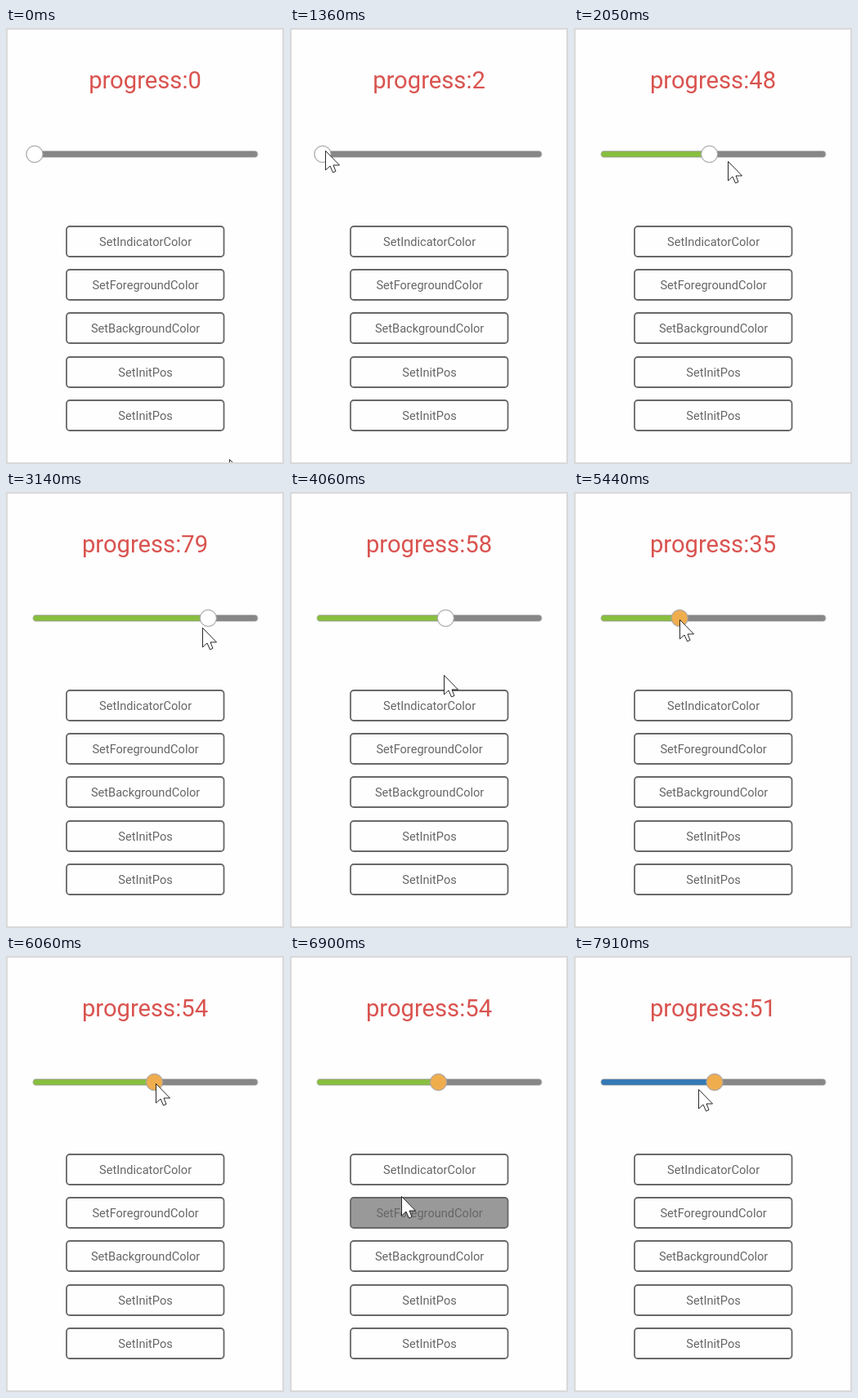
Animation of 340 by 534 pixels, one loop 7990 ms. Source, as an HTML page:

```html
<!DOCTYPE html>
<html lang="en">
<head>
<meta charset="utf-8">
<title>Slider demo</title>
<style>
  html, body { margin: 0; width: 100%; height: 100%; overflow: hidden; background: #fefefe; }
  svg { display: block; width: 340px; height: 534px; }
  text { font-family: Roboto, sans-serif; text-anchor: middle; }
  #label { font-size: 29.2px; fill: #d9534f; }
  .button rect { fill: #fefefe; stroke: #686868; stroke-width: 1.8; }
  .button text { font-size: 14.6px; fill: #666; }
  .button.pressed rect { fill: #999; }
  .track { stroke-linecap: round; }
</style>
</head>
<body>
<svg viewBox="0 0 340 534">
  <defs><clipPath id="inside"><rect x="2" y="2" width="336" height="530"/></clipPath></defs>
  <rect width="340" height="534" fill="#fefefe"/>
  <text id="label" x="170" y="74"></text>
  <g class="track">
    <path d="M37 154.5H304" stroke="#c9c9c9" stroke-width="9"/>
    <path d="M37 154.5H304" stroke="#878787" stroke-width="7"/>
    <path id="fill" stroke-width="6.4"/>
  </g>
  <circle id="halo" cy="154.5" r="11" fill="#aaa" opacity=".35"/>
  <circle id="knob" cy="154.5" r="10" stroke="#a5a0a0"/>
  <g id="buttons"></g>
  <rect x="1" y="1" width="338" height="532" fill="none" stroke="#d9d9d9" stroke-width="2"/>
  <g clip-path="url(#inside)">
    <path id="cursor" d="M.5 .5V24L6 19L9.5 27L13 25.5L10 18H17.5Z" fill="#fff" stroke="#111" stroke-width=".9"/>
  </g>
</svg>
<script>
const LOOP = 7990;
const TICK = 77;     // time between screen updates
const JITTER = 10;   // updates may come this much early
const $ = id => document.getElementById(id);

// Each gesture leads the cursor (and the knob, if dragged) to a new place.
// pace: exponent of the motion, above 1 speeds up, below 1 slows down.
const gestures = [
  { from: 70, to: 120, x: 86, y: 185 },
  { from: 500, to: 810, x: 37, y: 150 },
  { from: 1360, to: 2130, x: 210, y: 165, knob: 184.5, pace: 1.42 },
  { from: 2210, to: 2360, x: 234, y: 164, knob: 232, pace: .8 },
  { from: 2510, to: 2970, x: 249, y: 165, knob: 249 },
  { from: 3140, to: 3520, x: 195, y: 170, knob: 190.4, knobPace: 2 },
  { from: 3750, to: 4290, x: 183, y: 256 },
  { from: 4440, to: 4600, x: 195, y: 161 },
  { from: 4750, to: 4750, x: 190, y: 156 },
  { from: 5060, to: 5520, x: 119, y: 156, knob: 119 },
  { from: 5670, to: 6060, x: 183, y: 156, knob: 181.5 },
  { from: 6210, to: 6830, x: 132, y: 309 },
  { from: 6900, to: 6980, x: 153, y: 222, pace: 2.5 },
  { from: 7050, to: 7440, x: 186, y: 161, pace: .8 },
  { from: 7760, to: 7910, x: 152, y: 163, knob: 172 }
];

const mix = (a, b, k) => a + (b - a) * k;

// Share of a gesture done at its latest screen update
function progress({ from, to }, t) {
  const gaps = Math.round((to - from) / TICK);
  const done = gaps ? Math.floor((t - from + JITTER) / (to - from) * gaps) : 0;
  return Math.min(1, (done + 1) / (gaps + 1));
}

function poseAt(t) {
  const pose = { x: 273, y: 528, knob: 35 };
  for (const g of gestures) {
    if (t < g.from) break;
    const k = progress(g, t);
    const { pace = 1, knobPace = pace, knob = pose.knob } = g;
    pose.x = mix(pose.x, g.x, k ** pace);
    pose.y = mix(pose.y, g.y, k ** pace);
    pose.knob = mix(pose.knob, knob, k ** knobPace);
  }
  return pose;
}

$('buttons').innerHTML = ['SetIndicatorColor', 'SetForegroundColor', 'SetBackgroundColor', 'SetInitPos', 'SetInitPos']
  .map((name, i) => `<g class="button" transform="translate(0 ${Math.floor(i * 53.4)})">
    <rect x="74" y="243" width="192.5" height="37" rx="4"/><text x="170.6" y="267">${name}</text></g>`).join('');
const buttons = document.querySelectorAll('.button');

function draw(t) {
  const { x, y, knob } = poseAt(t);
  $('cursor').setAttribute('transform', `translate(${Math.round(x)} ${Math.round(y)})`);
  $('knob').setAttribute('cx', knob);
  $('halo').setAttribute('cx', knob);
  $('knob').setAttribute('fill', t < 4440 ? '#fff' : '#f0ad4e');
  $('fill').setAttribute('d', `M36.5 154.5H${Math.max(36.6, knob)}`);
  $('fill').setAttribute('stroke', t < 6975 ? '#89bf40' : '#337ab7');
  $('label').textContent = 'progress:' + Math.round((knob - 35) / 2.7);
  buttons[0].classList.toggle('pressed', t >= 4210 && t < 4440);
  buttons[1].classList.toggle('pressed', t >= 6750 && t < 6975);
}

const start = performance.now();
function tick() {
  draw((performance.now() - start) % LOOP);
  requestAnimationFrame(tick);
}
tick();
</script>
</body>
</html>
```
